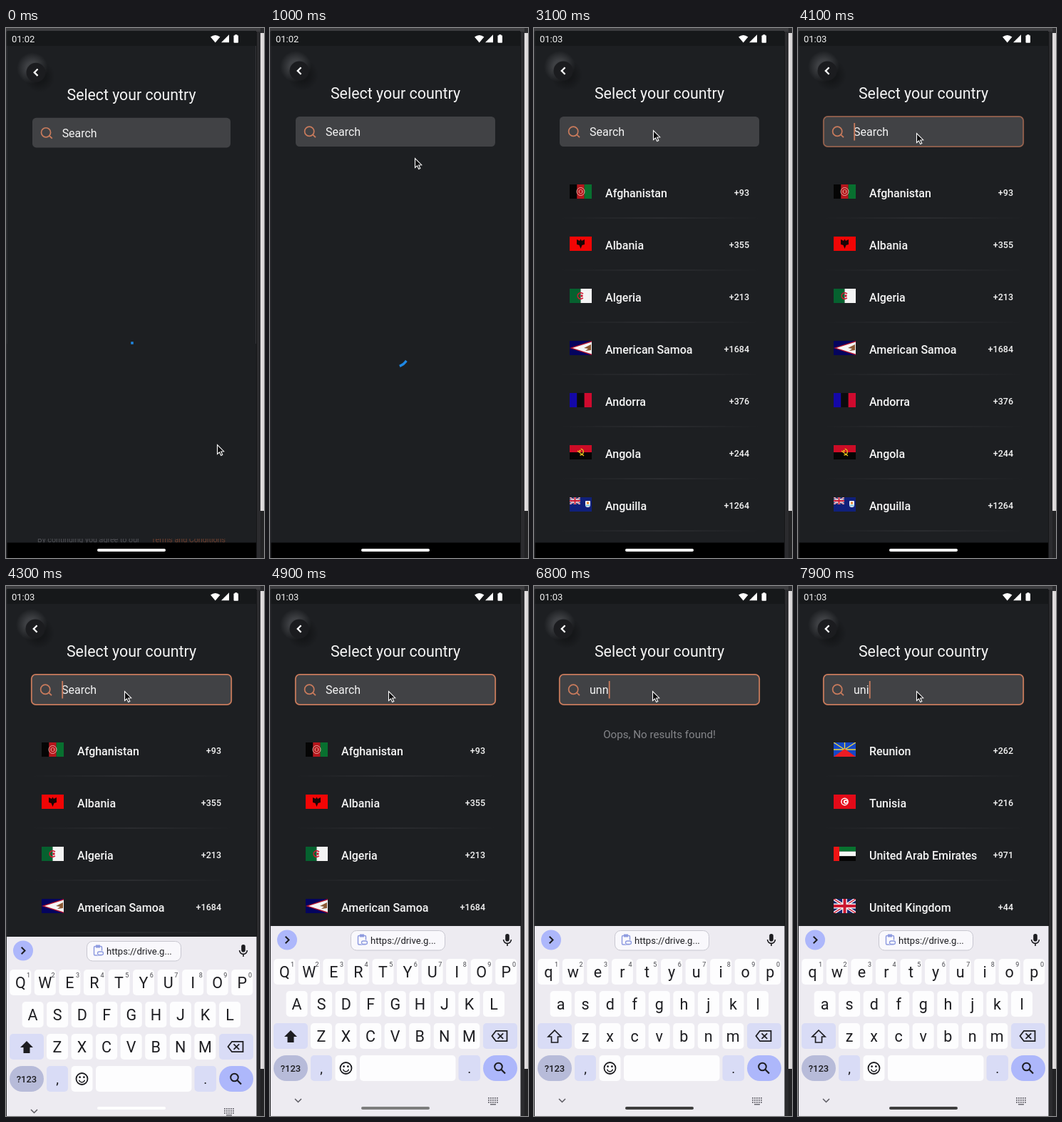
Recreate the animation shown at these times as an HTML page with a canvas. Size 362x742 px, loop 8000 ms.

```html
<!DOCTYPE html>
<html lang="en">
<head>
<meta charset="utf-8">
<title>Select your country</title>
<style>
html, body { margin: 0; width: 100%; height: 100%; overflow: hidden; background: #1d1f22; }
canvas { display: block; width: 362px; height: 742px; }
</style>
</head>
<body>
<canvas id="stage"></canvas>
<script>
const W = 362, H = 742, LOOP = 8000, STEP = 100;
const ACCENT = '#c97b5c', INK = '#1d1d21', BODY = '#1d1f22', TINT = '#d9dcf6';
const canvas = document.getElementById('stage');
const c = canvas.getContext('2d');
const dpr = window.devicePixelRatio || 1;
canvas.width = W * dpr;
canvas.height = H * dpr;

const clamp = v => Math.min(1, Math.max(0, v));
const lerp = (a, b, p) => a + (b - a) * p;
const ramp = (t, from, to) => clamp((t - from) / (to - from));

function rect(x, y, w, h, fill) {
  c.fillStyle = fill;
  c.fillRect(x, y, w, h);
}
function round(x, y, w, h, r, fill, stroke, lw = 1) {
  c.beginPath();
  c.roundRect(x, y, w, h, r);
  if (fill) { c.fillStyle = fill; c.fill(); }
  if (stroke) { c.strokeStyle = stroke; c.lineWidth = lw; c.stroke(); }
}
function disc(x, y, r, fill) {
  c.beginPath();
  c.arc(x, y, r, 0, 7);
  c.fillStyle = fill;
  c.fill();
}
function arc(x, y, r, a, b, stroke, lw) {
  c.beginPath();
  c.arc(x, y, r, a, b);
  c.strokeStyle = stroke;
  c.lineWidth = lw;
  c.stroke();
}
function trace(pts, closed) {
  c.beginPath();
  for (let i = 0; i < pts.length; i += 2) c.lineTo(pts[i], pts[i + 1]);
  if (closed) c.closePath();
}
function poly(fill, ...pts) {
  trace(pts, true);
  c.fillStyle = fill;
  c.fill();
}
function line(stroke, lw, ...pts) {
  trace(pts);
  c.strokeStyle = stroke;
  c.lineWidth = lw;
  c.stroke();
}
function text(s, x, y, size, fill, align = 'left', weight = 400) {
  c.font = `${weight} ${size}px Roboto, sans-serif`;
  c.textAlign = align;
  c.fillStyle = fill;
  c.fillText(s, x, y);
}

// Flags are drawn in a 31 x 20 box.
const bands = (...cols) => cols.forEach((f, i) => rect(0, i * 20 / cols.length, 31, 20 / cols.length, f));
const pales = (...cols) => cols.forEach((f, i) => rect(i * 31 / cols.length, 0, 31 / cols.length, 20, f));
function crescent(x, y, r, fill, back) {
  disc(x, y, r, fill);
  disc(x + r * 0.3, y, r * 0.75, back);
  disc(x + r * 0.45, y, r * 0.35, fill);
}
function unionJack(w, h) {
  c.save();
  c.beginPath();
  c.rect(0, 0, w, h);
  c.clip();
  rect(0, 0, w, h, '#16246c');
  for (const [col, k] of [['#f4f4f6', 0.2], ['#cc1730', 0.07]]) {
    line(col, h * k, 0, 0, w, h);
    line(col, h * k, w, 0, 0, h);
  }
  for (const [col, k] of [['#f4f4f6', 0.34], ['#cc1730', 0.2]]) {
    line(col, h * k, w / 2, 0, w / 2, h);
    line(col, h * k, 0, h / 2, w, h / 2);
  }
  c.restore();
}
function ensign(col) {
  rect(0, 0, 31, 20, col);
  unionJack(15, 10);
}
const FLAGS = {
  'Afghanistan'() {
    pales('#050505', '#b5161c', '#08702f');
    arc(15.5, 10, 5.5, 0, 7, '#e5a9a0', 1);
    disc(15.5, 10, 3, '#d98b80');
    rect(14, 8, 3, 4, '#b5161c');
  },
  'Albania'() {
    rect(0, 0, 31, 20, '#f20505');
    poly('#1a0505', 10, 4, 14, 6, 15.5, 3.5, 17, 6, 21, 4, 21, 11, 17.5, 12, 15.5, 17, 13.5, 12, 10, 11);
  },
  'Algeria'() {
    pales('#06612f', '#f4f4f4');
    arc(15.5, 10, 4.3, 0.7, 5.6, '#cf1730', 1.6);
    disc(17, 10, 1.7, '#cf1730');
  },
  'American Samoa'() {
    rect(0, 0, 31, 20, '#04045e');
    poly('#b5152d', 31, 0, 0, 10, 31, 20);
    poly('#f5f5f5', 31, 1.4, 4, 10, 31, 18.6);
    poly('#8c5a35', 30, 5, 20, 10, 26, 11, 22, 14, 30, 13);
  },
  'Andorra'() { pales('#1408a8', '#0b0b0d', '#cf0a2e'); },
  'Angola'() {
    bands('#cc0c26', '#050505');
    arc(15, 9.5, 4.3, -1.4, 1.7, '#e8c21c', 1.4);
    line('#e8c21c', 1.3, 11, 8, 20, 15);
    disc(14.5, 8, 1.3, '#e8c21c');
  },
  'Anguilla'() {
    ensign('#10207a');
    round(22, 5, 7, 9, [1, 1, 4, 4], '#f4f4f4');
    rect(22.5, 10.5, 6, 2, '#7cc5e0');
    disc(25.5, 8, 1.7, '#e8862a');
  },
  'Antigua and Barbuda'() {
    rect(0, 0, 31, 20, '#ce1126');
    poly('#111', 0, 0, 31, 0, 15.5, 20);
    disc(15.5, 7, 3.5, '#fcd116');
    poly('#0072c6', 6, 8, 25, 8, 21.5, 12.5, 9.5, 12.5);
    poly('#fff', 9.5, 12.5, 21.5, 12.5, 15.5, 20);
  },
  'Aruba'() {
    rect(0, 0, 31, 20, '#4189dd');
    rect(0, 13, 31, 1.4, '#f9d616');
    rect(0, 16, 31, 1.4, '#f9d616');
    poly('#d21034', 6, 2, 7, 5, 10, 6, 7, 7, 6, 10, 5, 7, 2, 6, 5, 5);
  },
  'Australia'() {
    ensign('#10207a');
    for (const [x, y] of [[7.5, 15], [23, 4], [19.5, 9], [27, 8], [23, 16]]) disc(x, y, 1.3, '#fff');
  },
  'Brunei Darussalam'() {
    rect(0, 0, 31, 20, '#f7e017');
    line('#fff', 4, 0, 3, 31, 14);
    line('#111', 3, 0, 6.5, 31, 17.5);
    disc(15.5, 10, 3.5, '#cf1126');
  },
  'Burundi'() {
    rect(0, 0, 31, 20, '#ce1126');
    poly('#1eb53a', 0, 0, 15.5, 10, 0, 20);
    poly('#1eb53a', 31, 0, 15.5, 10, 31, 20);
    line('#fff', 3, 0, 0, 31, 20);
    line('#fff', 3, 0, 20, 31, 0);
    disc(15.5, 10, 5, '#fff');
    disc(15.5, 10, 2, '#ce1126');
  },
  'Hungary'() { bands('#cd2a3e', '#fff', '#436f4d'); },
  'Reunion'() {
    rect(0, 0, 31, 20, '#1548c8');
    for (const [x, y] of [[0, 0], [15.5, 0], [31, 0], [0, 10], [31, 10]]) line('#f0d83c', 1.3, 15.5, 10, x, y);
    poly('#ec1c24', 0, 20, 15.5, 9, 31, 20);
  },
  'Tunisia'() {
    rect(0, 0, 31, 20, '#e30a18');
    disc(15.5, 10, 5.4, '#fff');
    crescent(15.5, 10, 3.9, '#e30a18', '#fff');
  },
  'United Arab Emirates'() {
    bands('#08722f', '#f6f6f6', '#050505');
    rect(0, 0, 8, 20, '#f01414');
  },
  'United Kingdom'() { unionJack(31, 20); }
};
const CODES = {
  'Afghanistan': 93, 'Albania': 355, 'Algeria': 213, 'American Samoa': 1684, 'Andorra': 376,
  'Angola': 244, 'Anguilla': 1264, 'Antigua and Barbuda': 1268, 'Aruba': 297, 'Australia': 61,
  'Brunei Darussalam': 673, 'Burundi': 257, 'Hungary': 36, 'Reunion': 262, 'Tunisia': 216,
  'United Arab Emirates': 971, 'United Kingdom': 44
};
const NAMES = Object.keys(CODES);

// [time, query]
const TYPING = [[0, ''], [5000, 'u'], [5200, 'un'], [5400, 'unn'], [5500, 'unno'], [5700, 'unnoi'],
  [6600, 'unno'], [6800, 'unn'], [7000, 'un'], [7900, 'uni']];
// [time, x, y]
const POINTER = [[0, 296, 583], [300, 286, 548], [900, 203, 190], [1400, 202, 150], [1800, 198, 142],
  [2100, 175, 140], [2400, 171, 131], [2800, 168, 140], [3400, 165, 146], [3700, 166, 147]];
const CARET_OFF = [[4900, 5000], [6200, 6600], [7500, 7900]];

function queryAt(t) {
  return TYPING.filter(k => k[0] <= t).pop()[1];
}
function pointerAt(t) {
  const i = POINTER.findIndex(k => k[0] > t);
  if (i < 0) return POINTER[POINTER.length - 1].slice(1);
  const a = POINTER[i - 1], b = POINTER[i], p = ramp(t, a[0], b[0]);
  return [Math.round(lerp(a[1], b[1], p)), Math.round(lerp(a[2], b[2], p))];
}

// cubic-bezier(.4, 0, .2, 1)
function ease(x) {
  let lo = 0, hi = 1;
  const bez = (a, b, s) => 3 * a * s * (1 - s) ** 2 + 3 * b * s * s * (1 - s) + s ** 3;
  for (let i = 0; i < 20; i++) {
    const m = (lo + hi) / 2;
    if (bez(0.4, 0.2, m) < x) lo = m; else hi = m;
  }
  return bez(0, 1, lo);
}
function spinner(t) {
  const ms = t * 1.0757, phase = ms / 1333 % 1;
  const head = ease(clamp(phase * 2)), tail = ease(clamp(phase * 2 - 1));
  const start = Math.PI * (-0.5 + 1.5 * tail + 2 * ms / 2222 + 0.5 * phase);
  const sweep = Math.max(1.5 * Math.PI * (head - tail), 0.001);
  c.lineCap = 'square';
  arc(177, 457.5, 16.5, start, start + sweep, '#1f88e4', 3.5);
  c.lineCap = 'butt';
}

function frameEdges() {
  rect(0, 0, W, H, '#2b2b2e');
  rect(0, 0, 357, 5, '#3d3d40');
  rect(357, 7, 5, 669, '#dedbdc');
  rect(357, 676, 5, 66, '#232325');
  rect(351, 5, 1, 737, '#151618');
  rect(1.5, 4, 349.5, 717, BODY);
  rect(1.5, 720.5, 349.5, 21.5, '#000');
}
function statusBar(t) {
  rect(1.5, 4, 349.5, 21, '#16181a');
  text(t < 1400 ? '01:02' : '01:03', 8, 20, 13, '#f2f2f2');
  c.beginPath();
  c.moveTo(293.7, 20.5);
  c.lineTo(287, 12.5);
  c.quadraticCurveTo(293.7, 7.5, 300.4, 12.5);
  c.fillStyle = '#fff';
  c.fill();
  poly('#fff', 302, 20.3, 313, 20.3, 313, 9.3);
  round(319.5, 10.3, 6.5, 10.4, 1, '#fff');
  rect(321.3, 9.2, 3, 2, '#fff');
}
function glow(x, y, r, rgb, alpha) {
  const g = c.createRadialGradient(x, y, r * 0.4, x, y, r);
  g.addColorStop(0, `rgba(${rgb},${alpha})`);
  g.addColorStop(1, `rgba(${rgb},0)`);
  disc(x, y, r, g);
}
function backButton() {
  glow(36, 54, 22, '90,92,96', 0.55);
  glow(46, 66, 22, '8,9,10', 0.4);
  disc(41, 60, 13.5, '#1b1c1f');
  line('#fff', 2.3, 43.6, 55.3, 38.8, 60, 43.6, 64.7);
}
function searchField(t, query) {
  const focus = ramp(t, 4000, 4150);
  round(36, 124, 280, 42, 5.5, '#414245');
  if (focus) {
    c.globalAlpha = focus;
    round(35.8, 123.8, 280.4, 42.4, 6, null, ACCENT, 1.8);
    c.globalAlpha = 1;
  }
  arc(55.2, 144.7, 6.6, 0, 7, ACCENT, 1.7);
  line(ACCENT, 1.8, 59.8, 149.2, 64, 153.2);
  text(query || 'Search', 78, 151, 16, '#f4f4f4');
  const end = 78 + (query ? c.measureText(query).width : 0);
  if (query && t < 5900) rect(78, 153, end - 78, 1, '#f4f4f4');
  if (t >= 4100 && !CARET_OFF.some(([a, b]) => t >= a && t < b)) rect(end + 0.3, 133, 1.8, 24.5, ACCENT);
}
function list(t, query) {
  const rows = NAMES.filter(n => n.toLowerCase().includes(query)).slice(0, 7);
  if (!rows.length) {
    text('Oops, No results found!', 176, 213, 15.15, '#85868a', 'center');
    return;
  }
  const rule = c.createLinearGradient(36, 0, 317, 0);
  rule.addColorStop(0, 'rgba(62,63,67,0)');
  rule.addColorStop(0.5, 'rgba(62,63,67,.8)');
  rule.addColorStop(1, 'rgba(62,63,67,0)');
  rows.forEach((name, i) => {
    const y = 73 * i;
    text(name, 100, 236.5 + y, 16, '#f4f4f4', 'left', 500);
    text('+' + CODES[name], 302, 235.3 + y, 12.5, '#f4f4f4', 'right', 500);
    rect(36, 265.5 + y, 281, 1, rule);
    if (t < 2900) return;
    c.save();
    c.translate(50, 219 + y);
    c.beginPath();
    c.rect(0, 0, 31, 20);
    c.clip();
    FLAGS[name]();
    c.restore();
  });
}
function page(t, query) {
  c.save();
  c.beginPath();
  c.rect(1.5, 25, 349.5, 695.5);
  c.clip();
  if (t < 200) {
    c.save();
    c.globalAlpha = 1 - t / 200;
    c.beginPath();
    c.rect(1, 715, 350, 6);
    c.clip();
    text('By continuing you agree to our ', 44, 720, 10.7, '#515257');
    text('Terms and Conditions', 308, 720, 10.7, '#70402f', 'right');
    c.restore();
    rect(1, 25, 1, 417, '#35363a');
    rect(350, 25, 1, 417, '#35363a');
  }
  const s = 1 - 0.007 * clamp(1 - t / 300) ** 2;
  c.translate(176, 371);
  c.scale(s, s);
  c.translate(-176, -371);
  backButton();
  text('Select your country', 176, 99, 21.4, '#f5f5f5', 'center');
  searchField(t, query);
  if (t >= 2800) list(t, query);
  c.restore();
  if (t < 2800) spinner(t);
}

function keyRow(chars, x, y, lower) {
  [...chars].forEach((ch, i) => {
    const cx = x + 34.55 * i;
    round(cx - 15, y, 30, 36, 5, '#fdfdfe');
    text(lower ? ch.toLowerCase() : ch, cx, y + (lower ? 25.5 : 26), 21.5, INK, 'center');
  });
}
function toolbar() {
  disc(24, 495.5, 14, '#adb7fb');
  line(INK, 2, 21.7, 490.7, 26.5, 495.5, 21.7, 500.3);
  round(113.5, 482.5, 132, 27.5, 8, '#f9f8fc', '#c8c7d0');
  round(123.5, 489.5, 11, 12.5, 1.5, null, '#8e9be0', 1.5);
  rect(126, 487.5, 6, 4, '#8e9be0');
  round(127, 495.5, 11, 7, 3.5, '#f9f8fc');
  round(128.5, 497, 8, 4.5, 2.2, null, '#8e9be0', 1.3);
  text('https://drive.g...', 141, 501, 13.1, INK);
  round(330.2, 487, 5.6, 10.5, 2.8, INK);
  arc(333, 495, 5.4, 0, Math.PI, INK, 1.6);
  line(INK, 1.6, 333, 500, 333, 504);
}
function shiftIcon(filled) {
  const pts = [29, 622, 38, 631, 33.5, 631, 33.5, 639, 24.5, 639, 24.5, 631, 20, 631];
  if (filled) return poly(INK, ...pts);
  trace(pts, true);
  c.strokeStyle = INK;
  c.lineWidth = 1.7;
  c.stroke();
}
function keyboard(t) {
  const drop = 266 * (1 - ramp(t, 4100, 4600)) ** 5.6;
  const lower = t >= 5100;
  c.save();
  c.beginPath();
  c.rect(1, 0, 350.5, H);
  c.clip();
  c.translate(0, Math.round(drop));
  rect(1, 476, 351, 266, '#edebf1');
  toolbar();

  keyRow('QWERTYUIOP', 20.3, 522, lower);
  [...'1234567890'].forEach((d, i) => text(d, 31.5 + 34.55 * i, 532.5, 9, '#46464c', 'center'));
  keyRow('ASDFGHJKL', 37.6, 567, lower);
  keyRow('ZXCVBNM', 72, 612, lower);

  round(5, 612, 48, 36, 5, TINT);
  shiftIcon(!lower);
  round(299, 612, 48, 36, 5, TINT);
  trace([311.5, 630, 317, 622.8, 332.5, 622.8, 332.5, 637.2, 317, 637.2], true);
  c.strokeStyle = INK;
  c.lineWidth = 1.8;
  c.stroke();
  line(INK, 1.7, 319.5, 626.3, 327.2, 633.8);
  line(INK, 1.7, 327.2, 626.3, 319.5, 633.8);

  round(5, 657, 48, 36, 18, '#b7bbd9');
  text('?123', 29, 680, 13, INK, 'center', 500);
  round(57, 657, 30, 36, 5, TINT);
  text(',', 72, 682, 19, INK, 'center');
  round(91.5, 657, 30, 36, 5, '#fdfdfe');
  arc(106.5, 675, 8, 0, 7, INK, 1.8);
  disc(103.6, 672.7, 1.4, INK);
  disc(109.4, 672.7, 1.4, INK);
  arc(106.5, 675.8, 4, 0.2, Math.PI - 0.2, INK, 1.6);
  round(126, 657, 134.5, 36, 5, '#fdfdfe');
  round(264.5, 657, 30.5, 36, 5, TINT);
  text('.', 279.7, 682, 19, INK, 'center');
  round(299, 657, 48, 36, 18, '#adb7fb');
  arc(320.5, 673, 5.3, 0, 7, INK, 2);
  line(INK, 2.2, 324.3, 676.8, 330, 682.5);

  line('#5c5b62', 1.5, 35, 718, 39.5, 722.5, 44, 718);
  for (let r = 0; r < 3; r++)
    for (let k = 0; k < 5; k++) rect(306 + 3 * k, 716 + 3 * r, 1.8, 1.8, '#6b6a72');
  rect(309, 725, 8, 1.5, '#6b6a72');
  c.restore();
}
function homePill(t) {
  const v = Math.round(255 - 117 * ramp(t, 4300, 4700) - 76 * ramp(t, 4800, 5400));
  round(128, 729, 96, 4, 2, `rgb(${v},${v},${v})`);
}
function pointer(t) {
  const [x, y] = pointerAt(t);
  c.save();
  c.translate(x + 0.5, y + 0.5);
  trace([0, 0, 0, 13, 3, 10.3, 5.2, 15, 7.3, 14, 5.2, 9.5, 9.2, 9.2], true);
  c.fillStyle = '#0c0c0e';
  c.fill();
  c.strokeStyle = '#fff';
  c.lineWidth = 1.1;
  c.stroke();
  c.restore();
}

function draw(t) {
  const query = queryAt(t);
  c.setTransform(dpr, 0, 0, dpr, 0, 0);
  frameEdges();
  page(t, query);
  statusBar(t);
  if (t > 4100) keyboard(t);
  homePill(t);
  pointer(t);
}

const origin = performance.now();
function tick() {
  const t = (performance.now() - origin) % LOOP;
  draw(Math.floor(t / STEP) * STEP);
  requestAnimationFrame(tick);
}
tick();
</script>
</body>
</html>
```
